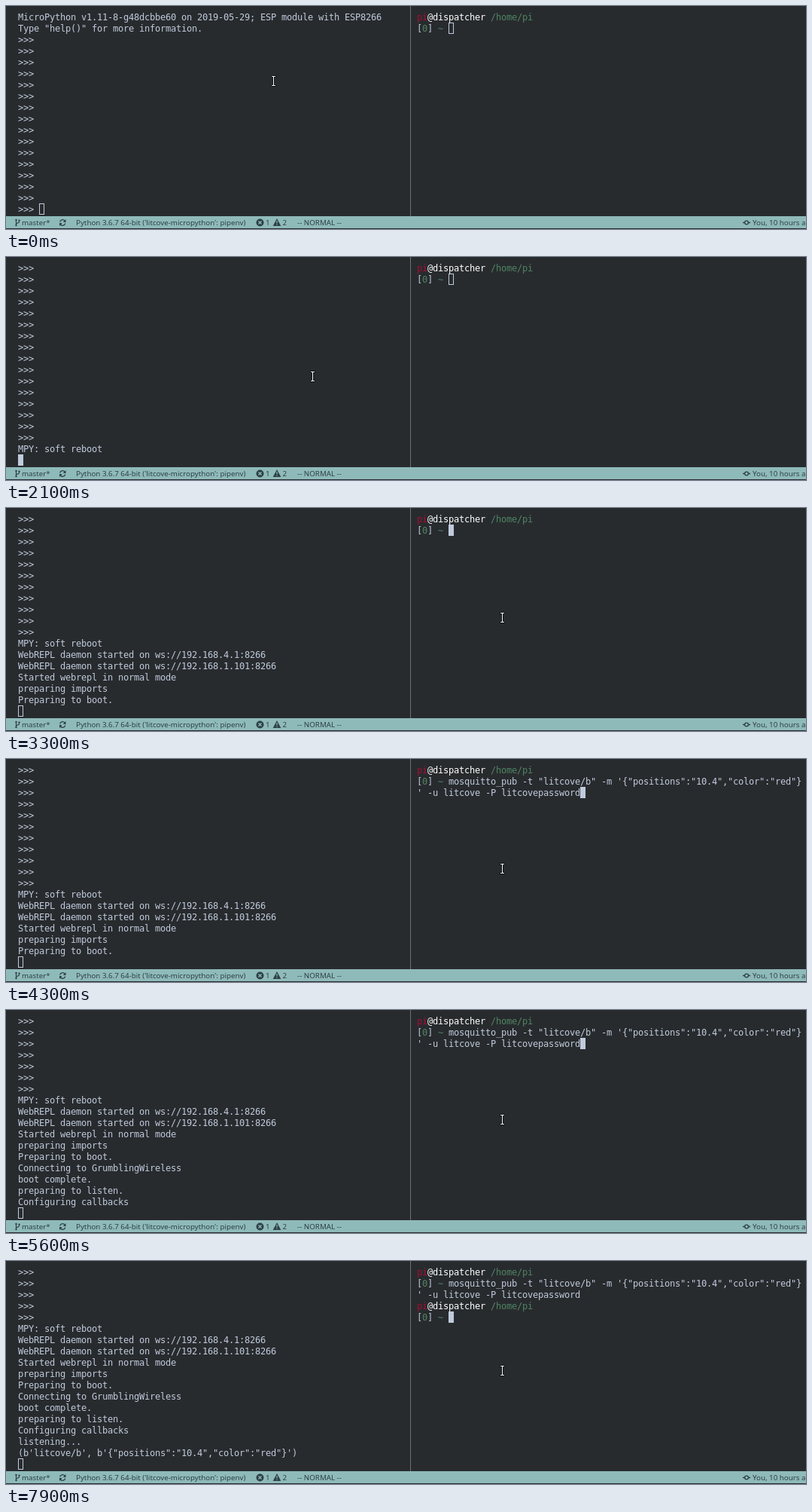
Animation of 1063x296 px, one loop 8000 ms. Source, as an HTML page with a canvas:

```html
<!DOCTYPE html>
<html lang="en">
<head>
<meta charset="utf-8">
<title>Terminal session</title>
<style>
html, body { margin: 0; width: 100%; height: 100%; overflow: hidden; background: #282b2e; }
canvas { display: block; }
</style>
</head>
<body>
<canvas id="stage" width="1063" height="296"></canvas>
<script>
const ctx = document.getElementById('stage').getContext('2d');
const LOOP = 8000, CELL_W = 7, CELL_H = 15, TOP = 7, ROWS = 18;
const LEFT = 16, RIGHT = 546;
const C = {
  bg: '#282b2e', text: '#c0cbdc', white: '#ffffff', red: '#a80d35', green: '#4f8563',
  divider: '#6d7173', bar: '#8fbaba', ink: '#2c4045'
};

// Lines printed by the board: [time, text]
const LOG = [
  [0, 'MicroPython v1.11-8-g48dcbbe60 on 2019-05-29; ESP module with ESP8266'],
  [0, 'Type "help()" for more information.'],
  ...Array.from({ length: 16 }, () => [0, '>>> ']),
  [2100, 'MPY: soft reboot'],
  [2200, 'WebREPL daemon started on ws://192.168.4.1:8266'],
  [2200, 'WebREPL daemon started on ws://192.168.1.101:8266'],
  [2200, 'Started webrepl in normal mode'],
  [2900, 'preparing imports'],
  [3100, 'Preparing to boot.'],
  [5200, 'Connecting to GrumblingWireless'],
  [5400, 'boot complete.'],
  [5600, 'preparing to listen.'],
  [5600, 'Configuring callbacks'],
  [6300, 'listening...'],
  [7900, '(b\'litcove/b\', b\'{"positions":"10.4","color":"red"}\')']
];
const COMMAND = [
  'mosquitto_pub -t "litcove/b" -m \'{"positions":"10.4","color":"red"}',
  "' -u litcove -P litcovepassword"
];

// Pointer stops: [time, left, top]
const POINTER = [
  [0, 352, 92], [1200, 380, 124], [1300, 404, 151], [2700, 440, 148],
  [2800, 555, 138], [2900, 623, 133], [3000, 648, 136], [3100, 656, 138]
];

function rect(color, x, y, w, h) {
  ctx.fillStyle = color;
  ctx.fillRect(x, y, w, h);
}

// Writes on the character grid and returns the next column.
function write(str, origin, row, col = 0, color = C.text) {
  ctx.font = '12px "DejaVu Sans Mono", monospace';
  ctx.fillStyle = color;
  for (const ch of str) {
    if (ch !== ' ') ctx.fillText(ch, origin + col * CELL_W, TOP + row * CELL_H + 12);
    col++;
  }
  return col;
}

function cursor(origin, row, col, solid) {
  const x = origin + col * CELL_W, y = TOP + row * CELL_H;
  if (solid) return rect(C.text, x, y, CELL_W, CELL_H);
  ctx.strokeStyle = C.text;
  ctx.lineWidth = 1;
  ctx.strokeRect(x + 0.5, y + 0.5, CELL_W - 1, CELL_H - 1);
}

function leftPane(t) {
  const lines = LOG.filter(([time]) => time <= t).map(([, str]) => str);
  if (t >= 2100) lines.push('');
  const shown = lines.slice(-ROWS);
  shown.forEach((str, row) => write(str, LEFT, row));
  cursor(LEFT, ROWS - 1, shown[ROWS - 1].length, t >= 1500 && t < 3300);
}

function prompt(row) {
  let col = write('pi', RIGHT, row, 0, C.red);
  col = write('@dispatcher', RIGHT, row, col, C.white);
  write(' /home/pi', RIGHT, row, col, C.green);
  write('[', RIGHT, row + 1);
  write('0', RIGHT, row + 1, 1, C.green);
  write(']', RIGHT, row + 1, 2);
  write('~', RIGHT, row + 1, 4, C.green);
}

function rightPane(t) {
  let row = 1, col = 6;
  prompt(0);
  if (t >= 4300) {
    write(COMMAND[0], RIGHT, 1, 6);
    col = write(COMMAND[1], RIGHT, 2);
    row = 2;
  }
  if (t >= 7900) {
    prompt(3);
    row = 4;
    col = 6;
  }
  cursor(RIGHT, row, col, t >= 3300);
}

function stroke(path, width = 1) {
  ctx.lineWidth = width;
  ctx.stroke(new Path2D(path));
}

function circle(x, y, r, filled) {
  ctx.beginPath();
  ctx.arc(x, y, r, 0, Math.PI * 2);
  filled ? ctx.fill() : ctx.stroke();
}

function statusIcons() {
  ctx.strokeStyle = ctx.fillStyle = C.ink;
  // branch
  stroke('M13.5 285V290M17.5 285.5V286Q17.5 288 13.5 288.7', 1.2);
  for (const [x, y] of [[13.5, 284], [17.5, 284.6], [13.5, 291]]) circle(x, y, 1.2, true);
  // sync
  stroke('M71.6 286.5A3.7 3.7 0 0 1 78 285M78.8 288.5A3.7 3.7 0 0 1 72.4 290', 1.2);
  ctx.fill(new Path2D('M79.5 283V287H75.8ZM71 292V288H74.7Z'));
  // error and warning
  circle(337.5, 287.5, 5, true);
  ctx.fill(new Path2D('M360 282L365.3 292H354.7Z'));
  // commit
  ctx.lineWidth = 1.3;
  circle(984, 287.5, 2.4);
  stroke('M979 287.5H981.6M986.4 287.5H989', 1.3);
  ctx.strokeStyle = C.bar;
  stroke('M335.5 285.5L339.5 289.5M339.5 285.5L335.5 289.5', 1.3);
  stroke('M360 285V288.6M360 289.6V290.8', 1.2);
}

function statusBar() {
  rect(C.bar, 0, 279, 1063, 16);
  statusIcons();
  ctx.font = '9.75px "Noto Sans", "Open Sans", sans-serif';
  ctx.fillStyle = C.ink;
  const items = [
    [21, 'master*'], [93, "Python 3.6.7 64-bit ('litcove-micropython': pipenv)"],
    [345, '1'], [367.5, '2'], [387, '-- NORMAL --'], [992, 'You, 10 hours ago']
  ];
  for (const [x, str] of items) ctx.fillText(str, x, 291);
}

function pointer(t) {
  const [, x, y] = POINTER.filter(([time]) => time <= t).pop();
  const dark = '#101214';
  rect(dark, x, y, 7, 3);
  rect(dark, x, y + 12, 7, 3);
  rect(dark, x + 2, y, 3, 15);
  rect(C.white, x + 1, y + 1, 5, 1);
  rect(C.white, x + 1, y + 13, 5, 1);
  rect(C.white, x + 3, y + 1, 1, 13);
}

function draw(t) {
  rect(C.bg, 0, 0, 1063, 296);
  rect(C.divider, 537, 0, 1, 279);
  leftPane(t);
  rightPane(t);
  statusBar();
  pointer(t);
}

const start = performance.now();
function tick() {
  draw((performance.now() - start) % LOOP);
  requestAnimationFrame(tick);
}
tick();
</script>
</body>
</html>
```
